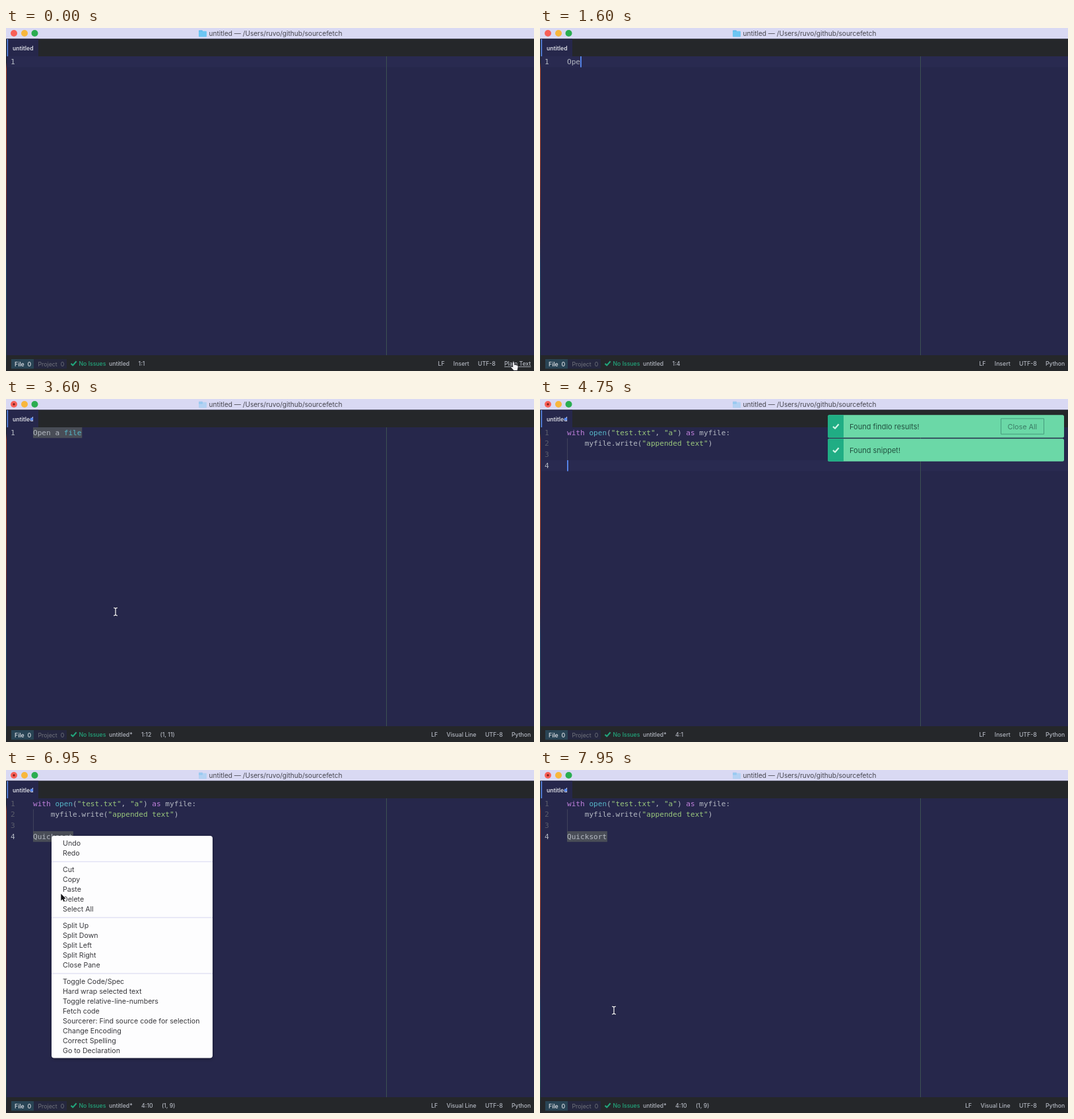
An HTML page with a canvas for the animation above (8000 ms loop, 800 by 521 pixels).

```html
<!DOCTYPE html>
<html lang="en">
<head>
<meta charset="utf-8">
<title>Editor demo</title>
<style>
html, body { margin: 0; width: 100%; height: 100%; overflow: hidden; background: #26274b; }
canvas { display: block; width: 800px; height: 521px; }
</style>
</head>
<body>
<canvas id="stage"></canvas>
<script>
const W = 800, H = 521, LOOP = 8000;
const canvas = document.getElementById('stage');
const ratio = window.devicePixelRatio || 1;
canvas.width = W * ratio;
canvas.height = H * ratio;
const c = canvas.getContext('2d');

const UI = 'Inter, sans-serif';
const MONO = '11.1px "DejaVu Sans Mono", monospace';
const CHAR = 6.68, LINE = 16.65, CODE_X = 41, CODE_Y = 43;
const COL = {
  editor: '#26274b', chrome: '#25272a', text: '#b4b9c3', dim: '#5b5d6b',
  cyan: '#56b6c8', purple: '#c080dc', green: '#9ac77c', select: '#494d57',
  blue: '#5a8cf5', ok: '#22a67c', toast: '#6bd8a7', toastIcon: '#20ad84'
};

const MENU = [
  ['Undo', 'Redo'],
  ['Cut', 'Copy', 'Paste', 'Delete', 'Select All'],
  ['Split Up', 'Split Down', 'Split Left', 'Split Right', 'Close Pane'],
  ['Toggle Code/Spec', 'Hard wrap selected text', 'Toggle relative-line-numbers',
   'Fetch code', 'Sourcerer: Find source code for selection', 'Change Encoding',
   'Correct Spelling', 'Go to Declaration']
];

const SNIPPET = [
  [['with', COL.purple], [' '], ['open', COL.cyan], ['('], ['"test.txt"', COL.green], [', '],
   ['"a"', COL.green], [') '], ['as', COL.purple], [' myfile:']],
  [['    myfile.write('], ['"appended text"', COL.green], [')']]
];

// Event times in ms
const T = {
  python: 1050, type1: 1400, modified: 1900, select1: 2450,
  menu1: 2850, fetch1: 3500, toast1: 4000, toast2: 4300, insert: 4400,
  newline: 4650, type2: 4800, select2: 5600, hide1: 6240, hide2: 6560,
  menu2: 6650, fetch2: 7680
};

// Mouse path: time, x, y
const PATH = [
  [2500, 84, 50], [2750, 90, 57], [2880, 91, 57], [3380, 166, 323], [5850, 166, 323],
  [6250, 62, 85], [6500, 69, 100], [6700, 69, 100], [7350, 112, 365], [8000, 112, 365]
];

const clamp = v => Math.max(0, Math.min(1, v));
const ease = v => v * v * (3 - 2 * v);
const within = (t, a, b) => t >= a && t < b;

function rect(x, y, w, h, fill) {
  c.fillStyle = fill;
  c.fillRect(x, y, w, h);
}

function round(x, y, w, h, r, fill) {
  c.beginPath();
  c.roundRect(x, y, w, h, r);
  c.fillStyle = fill;
  c.fill();
}

function dot(x, y, r, fill) {
  c.beginPath();
  c.arc(x, y, r, 0, Math.PI * 2);
  c.fillStyle = fill;
  c.fill();
}

function line(points, color, width) {
  c.beginPath();
  points.forEach(([x, y]) => c.lineTo(x, y));
  c.strokeStyle = color;
  c.lineWidth = width;
  c.stroke();
}

function label(str, x, y, font, color) {
  c.font = font;
  c.fillStyle = color;
  c.fillText(str, x, y);
  return c.measureText(str).width;
}

const ui = (str, x, y, size, color, weight = 400) =>
  label(str, x, y, `${weight} ${size}px ${UI}`, color);

function check(x, y, s, color) {
  line([[x, y + 3.6 * s], [x + 3 * s, y + 6.4 * s], [x + 8.6 * s, y]], color, 2.2 * s);
}

function mouseAt(t) {
  let i = PATH.findIndex(p => p[0] > t);
  if (i < 1) i = PATH.length - 1;
  const [t0, x0, y0] = PATH[i - 1], [t1, x1, y1] = PATH[i];
  const k = ease(clamp((t - t0) / (t1 - t0)));
  return [x0 + (x1 - x0) * k, y0 + (y1 - y0) * k];
}

function docState(t) {
  const typed = (word, start, step) =>
    word.slice(0, Math.max(0, Math.floor((t - start) / step) + 1));
  const s = { lines: [], row: 1, col: 1, sel: 0, mode: 'Insert', caret: true };
  let word = '';
  if (t < T.insert) {
    word = typed('Open a file', T.type1, 80);
    s.lines = [word.length === 11 ? [['Open a '], ['file', COL.cyan]] : [[word]]];
    if (t >= T.select1) s.sel = 11;
  } else {
    const after = t >= T.newline;
    s.lines = after ? [...SNIPPET, [['']], [['']]] : SNIPPET;
    s.row = after ? 4 : 2;
    word = typed('Quicksort', T.type2, 75);
    if (after) s.lines[3] = [[word]];
    if (t >= T.select2) s.sel = 9;
  }
  s.col = s.row === 2 ? 34 : word.length + 1;
  s.caret = !s.sel && t > T.python;
  if (s.sel) s.mode = 'Visual Line';
  return s;
}

function drawWindow(modified) {
  rect(0, 0, W, H, COL.editor);
  rect(0, 0, W, 16.5, '#d9d9f3');
  rect(0, 16.5, W, 26.5, COL.chrome);
  rect(2, 16.5, 47, 26.5, COL.editor);
  rect(1.5, 17, 1.6, 26, COL.blue);
  rect(0, 497, W, 24, COL.chrome);

  const edge = c.createLinearGradient(0, 17, 0, H);
  [[0, '#25262c'], [.07, '#25262c'], [.09, '#b04a2c'], [.35, '#a8452c'],
   [.58, '#5a2c38'], [.68, '#24466c'], [.9, '#245058'], [1, '#25262c']]
    .forEach(([k, col]) => edge.addColorStop(k, col));
  rect(0, 17, 1, H - 17, edge);

  dot(12, 8, 5, '#f85f57');
  dot(28, 8, 5, '#f8b73c');
  dot(43.5, 8, 5, '#2aad50');
  if (modified) dot(12, 8, 1.7, '#7c1f1c');

  c.globalAlpha = modified ? .35 : 1;
  round(292, 3.5, 6, 4, 1, '#55b5ea');
  round(292, 4.7, 12, 8.8, 1, '#6cc6f3');
  c.globalAlpha = 1;
  ui('untitled — /Users/ruvo/github/sourcefetch', 307.5, 12, 10.1, '#46464e');
  ui('untitled', 10, 33.5, 8.6, '#dadce4', 600);
  if (modified) dot(39, 30.5, 2.3, COL.blue);
}

function drawCode(s) {
  const rowY = n => CODE_Y + (n - 1) * LINE;
  if (!s.sel) rect(2, rowY(s.row), W - 2, LINE, '#292a50');
  rect(576, CODE_Y, 1, 454, '#3c5152');
  if (s.lines.length > 1) {
    rect(CODE_X, rowY(2), 1, LINE * (s.lines.length > 2 ? 2 : 1), '#40435c');
  }
  if (s.sel) rect(CODE_X, rowY(s.row), s.sel * CHAR + .8, LINE - .4, COL.select);
  s.lines.forEach((parts, i) => {
    const base = rowY(i + 1) + 11.8;
    label(String(i + 1), 7, base, MONO, i + 1 === s.row ? COL.text : COL.dim);
    let x = CODE_X;
    parts.forEach(([str, color]) => {
      x += label(str, x, base, MONO, color || COL.text);
    });
  });
  if (s.caret) rect(CODE_X + (s.col - 1) * CHAR, rowY(s.row), 1.8, LINE, COL.blue);
}

function drawStatus(t, s, modified) {
  const base = 513, gap = 13.3;
  const item = (str, x, color = '#b3b7c0') => ui(str, x, base, 8.7, color, 500);
  rect(8, 503, 34, 14.5, '#294455');
  rect(42, 503, 50, 14.5, '#25273f');
  ui('File  0', 13, 514, 8.8, '#e2e5ea', 500);
  ui('Project  0', 48.5, 514, 8.8, '#70737c', 400);
  check(98.5, 506.3, .95, COL.ok);
  item('No Issues', 110.5, COL.ok);

  let x = 156;
  const left = [modified ? 'untitled*' : 'untitled', `${s.row}:${s.col}`];
  if (s.sel) left.push(`(1, ${s.sel})`);
  left.forEach(str => { x += item(str, x) + gap; });

  const grammar = t < T.python ? 'Plain Text' : 'Python';
  x = 795.3;
  [grammar, 'UTF-8', s.mode, 'LF'].forEach((str, i) => {
    c.font = `500 8.7px ${UI}`;
    const w = c.measureText(str).width;
    x -= w;
    item(str, x);
    if (!i && t < 400) rect(x, 514.2, w, .9, '#b3b7c0');
    x -= gap;
  });
}

function drawToast(t, y, text, shown, hidden, closeAll) {
  if (!within(t, shown, hidden + 120)) return;
  const enter = clamp((t - shown) / 120), leave = clamp((t - hidden) / 120);
  const scale = 1 - .2 * leave;
  c.save();
  c.globalAlpha = enter * (1 - leave);
  c.translate(615, y + 17.2);
  c.scale(scale, scale * enter);
  c.translate(-615, -17.2);
  round(436, 0, 358, 34.5, 2.5, COL.toast);
  round(436, 0, 24, 34.5, [2.5, 0, 0, 2.5], COL.toastIcon);
  check(444, 14, 1, '#d2f5e6');
  ui(text, 469, 21.3, 11, '#22513f');
  if (closeAll) {
    c.strokeStyle = '#469c7d';
    c.lineWidth = 1;
    c.strokeRect(698.5, 5.5, 65, 23.5);
    ui('Close All', 708.5, 21.2, 10.8, '#3b7d66');
  }
  c.restore();
}

function drawToasts(t) {
  const rise = ease(clamp((t - T.hide1 - 120) / 60));
  drawToast(t, 24.3, 'Found findlo results!', T.toast1, T.hide1, t >= T.toast2);
  drawToast(t, 60.3 - 36 * rise, 'Found snippet!', T.toast2, T.hide2, false);
}

function drawMenu(x, y) {
  c.save();
  c.shadowColor = 'rgba(0, 0, 0, .35)';
  c.shadowBlur = 5 * ratio;
  c.shadowOffsetY = 1.5 * ratio;
  round(x, y, 244, 337.5, 4, '#fdfdfe');
  c.restore();
  let row = y + 11;
  MENU.forEach((group, i) => {
    if (i) {
      rect(x, row - 2.5, 244, 1.2, '#dcdcf2');
      row += 9.7;
    }
    group.forEach(str => {
      ui(str, x + 17, row + 4, 10.6, '#38383c');
      row += 15.05;
    });
  });
}

function drawBeam(x, y) {
  const stroke = (color, w) => {
    line([[x, y - 5.5], [x, y + 5.5]], color, w);
    line([[x - 2.8, y - 6], [x, y - 5.2], [x + 2.8, y - 6]], color, w);
    line([[x - 2.8, y + 6], [x, y + 5.2], [x + 2.8, y + 6]], color, w);
  };
  stroke('#20203a', 2.6);
  stroke('#f2f2f6', 1.3);
}

function shape(points, x, y, fill, edge) {
  c.beginPath();
  points.forEach(([dx, dy]) => c.lineTo(x + dx, y + dy));
  c.closePath();
  c.lineJoin = 'round';
  c.strokeStyle = edge;
  c.lineWidth = 1.6;
  c.stroke();
  c.fillStyle = fill;
  c.fill();
}

const ARROW = [[0, 0], [0, 10.5], [2.5, 8.3], [4.2, 12], [5.9, 11.2], [4.3, 7.6], [7.4, 7.4]];
const HAND = [[0, 0], [1.6, 0], [2.2, 4.6], [4, 4], [5.4, 5], [7, 5], [7.8, 7],
  [6.6, 12.4], [1.4, 12.4], [-2.8, 7.8], [-2, 6.8], [0.2, 8]];

function drawPointer(t, menuOpen) {
  if (t < 700) {
    shape(HAND, 768, 507.5, '#f5f5f8', '#22222a');
    return;
  }
  if (!within(t, 2500, 4600) && t < 5850) return;
  const [x, y] = mouseAt(t);
  if (menuOpen) shape(ARROW, x, y, '#111114', '#ffffff');
  else drawBeam(x, y);
}

function draw(t) {
  c.setTransform(ratio, 0, 0, ratio, 0, 0);
  const s = docState(t);
  const modified = t >= T.modified;
  const menu1 = within(t, T.menu1, T.fetch1);
  const menu2 = within(t, T.menu2, T.fetch2);
  drawWindow(modified);
  drawCode(s);
  drawStatus(t, s, modified);
  drawToasts(t);
  if (menu1) drawMenu(91, 57);
  if (menu2) drawMenu(69, 100);
  drawPointer(t, menu1 || menu2);
}

const start = performance.now();
function frame() {
  draw((performance.now() - start) % LOOP);
  requestAnimationFrame(frame);
}
frame();
</script>
</body>
</html>
```
